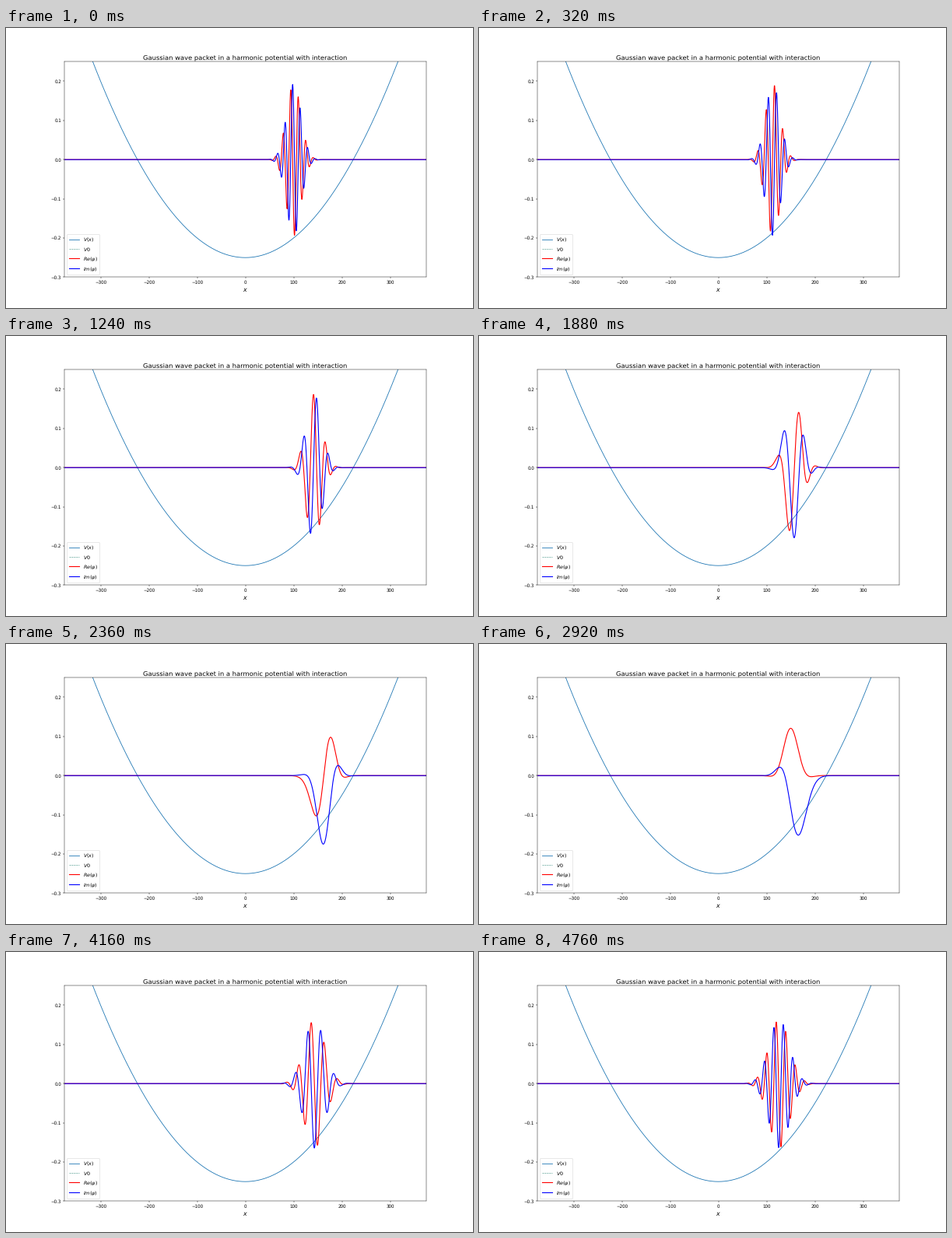
These frames come from a looping animation (600 by 360 pixels, 4.8 s). A matplotlib script:

```python
import numpy as np
import matplotlib.pyplot as plt
from matplotlib.animation import FuncAnimation

plt.rcParams["font.family"] = "DejaVu Sans"
plt.rcParams["mathtext.fontset"] = "dejavusans"
plt.rcParams["text.hinting"] = "none"

FRAMES, INTERVAL = 120, 40
X_MAX = 375
DEPTH = 0.25                  # bottom of the well lies at -DEPTH
OMEGA = np.sqrt(1e-5)         # trap frequency
X0, K0 = 100.0, 0.4           # starting centre and wave number
S0 = 15 / np.sqrt(2)          # starting width
T_STEP, T_START = 4.18, 0.8   # simulated time per frame and at the start

x = np.linspace(-X_MAX, X_MAX, 3001)


def packet(t):
    """Exact Gaussian wave packet moving in the harmonic well."""
    c, s = np.cos(OMEGA * t), np.sin(OMEGA * t)
    pos = X0 * c + K0 / OMEGA * s
    mom = K0 * c - OMEGA * X0 * s
    ratio = 1 / (2 * S0**2 * OMEGA)
    var = S0**2 * (c**2 + (ratio * s)**2)
    chirp = OMEGA * s * c * S0**2 * (ratio**2 - 1) / (2 * var)
    d = x - pos
    phase = (X0 * K0 + pos * mom) / 2 + DEPTH * t
    phase -= np.arctan2(ratio * s, c) / 2
    envelope = (2 * np.pi * var) ** -0.25 * np.exp(-d**2 / (4 * var))
    return envelope * np.exp(1j * (phase + mom * d + chirp * d**2))


fig, ax = plt.subplots(figsize=(15, 9), dpi=40)
fig.subplots_adjust(left=0.125, right=0.9, bottom=0.11, top=0.88)
ax.set_xlim(-X_MAX, X_MAX)
ax.set_ylim(-0.3, 0.25)
ax.set_yticks(np.arange(-3, 3) / 10)
ax.set_title("Gaussian wave packet in a harmonic potential with interaction",
             fontsize=15)
ax.set_xlabel("$x$", fontsize=14)

ax.plot(x, OMEGA**2 * x**2 / 2 - DEPTH, color="tab:blue", lw=1.5,
        label="$V(x)$")
ax.plot([], [], "--", color="#2f8a7a", lw=1, label="$V0$")
real, = ax.plot([], [], color="red", lw=2, label=r"$Re(\psi)$")
imag, = ax.plot([], [], color="blue", lw=2, label=r"$Im(\psi)$")
ax.legend(loc="lower left", fontsize=11.5)


def update(i):
    psi = packet(T_START + T_STEP * i)
    real.set_data(x, psi.real)
    imag.set_data(x, psi.imag)
    return real, imag


anim = FuncAnimation(fig, update, frames=FRAMES, interval=INTERVAL,
                     repeat=True, repeat_delay=0)
plt.show()
```
